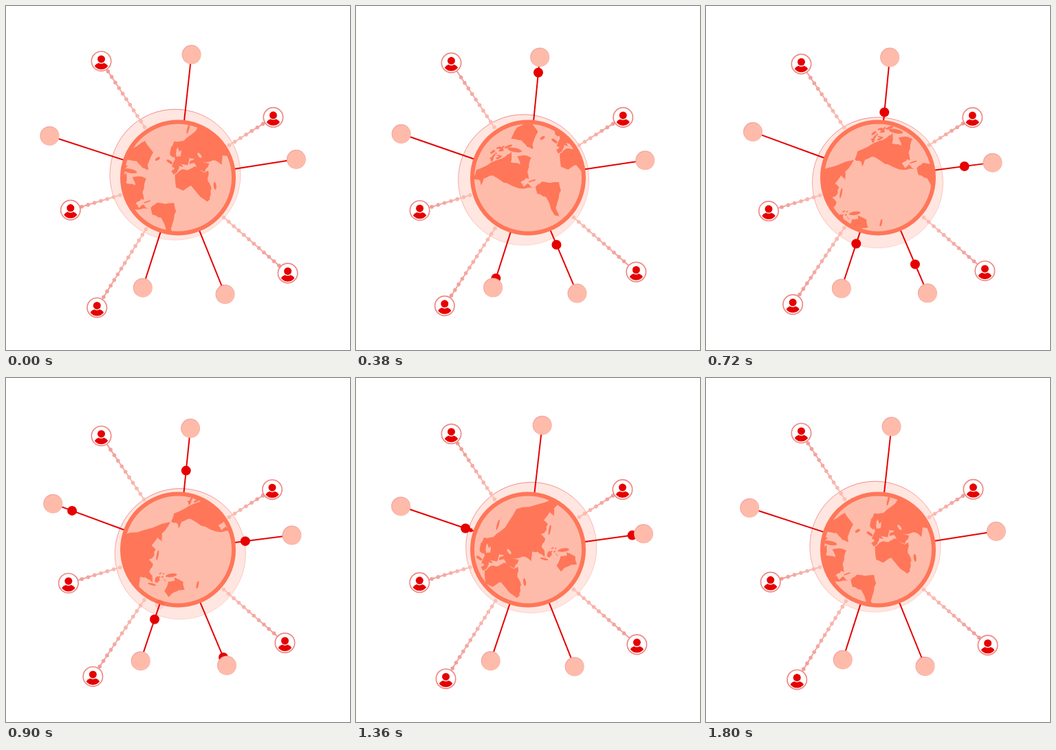
Animation, 500 px wide and 500 px high, one loop 1820 ms. Source, as an HTML page with a canvas:

```html
<!DOCTYPE html>
<html lang="en">
<head>
<meta charset="utf-8">
<title>Global network</title>
<style>
html, body { margin: 0; width: 100%; height: 100%; overflow: hidden; background: #fff; }
canvas { display: block; width: 500px; height: 500px; }
</style>
</head>
<body>
<canvas id="stage" width="500" height="500"></canvas>
<script>
const ctx = document.getElementById('stage').getContext('2d');
const TAU = Math.PI * 2;
const LOOP = 1820, TURN = 1800, STEP = 20, SPAN = 540;
const CX = 250, CY = 249.5, RIM = 84;
const RED = '#e60000', CORAL = '#ff7658', PEACH = '#ffbbaa';
const rad = d => d * Math.PI / 180;

let seed = 7;
function random() {
  seed = seed * 16807 % 2147483647;
  return seed / 2147483647;
}
const jitter = r => (random() * 2 - 1) * r;

// World map: softened Mercator, key points joined by rough coastlines
const WIDTH = 280, SCALE = WIDTH / 360, SOFT = .88;
const lands = [];

function project(lon, lat) {
  const y = Math.log(Math.tan(Math.PI / 4 + rad(lat) * SOFT / 2)) / SOFT;
  return [lon * SCALE, -y * WIDTH / TAU];
}

function land(...c) {
  const points = [];
  for (let i = 0; i < c.length; i += 2) points.push(project(c[i], c[i + 1]));
  const path = new Path2D();
  points.forEach(([x, y], i) => {
    const [nx, ny] = points[(i + 1) % points.length];
    const rough = Math.min(.9, Math.hypot(nx - x, ny - y) * .1);
    path.lineTo(x, y);
    for (const k of [.33, .67]) path.lineTo(x + (nx - x) * k + jitter(rough), y + (ny - y) * k + jitter(rough));
  });
  path.closePath();
  lands.push(path);
}

// Lens-shaped island between two places
function lens(lon1, lat1, lon2, lat2, width) {
  const [x1, y1] = project(lon1, lat1), [x2, y2] = project(lon2, lat2);
  const path = new Path2D();
  path.ellipse((x1 + x2) / 2, (y1 + y2) / 2, Math.hypot(x2 - x1, y2 - y1) / 2, width / 2,
    Math.atan2(y2 - y1, x2 - x1), 0, TAU);
  return path;
}
const isle = (...args) => lands.push(lens(...args));

function scatter(lon, lat, dLon, dLat, count, size) {
  for (let i = 0; i < count; i++) {
    const a = lon + jitter(dLon), b = lat + jitter(dLat);
    isle(a, b, a + size + jitter(size), b + jitter(size / 3), 1.5 + random() * size / 4);
  }
}

// Africa
land(-6,36, 10,37, 20,31, 33,31, 43,12, 51,12, 40,-5, 40,-15, 33,-26, 26,-34, 19,-35, 12,-17, 9,4,
  -8,4, -17,15, -10,30);
// Eurasia
land(-9,37, -9,43, -1,44, -4,48, 8,54, 10,57, 20,54, 28,60, 22,60, 24,65, 18,61, 13,56, 6,58, 5,62, 14,68,
  25,71, 40,67, 68,69, 104,77, 140,72, 190,66, 165,60, 157,51, 155,59, 137,54, 140,47, 127,39, 119,39, 122,30,
  108,21, 109,12, 103,2, 97,17, 88,22, 78,8, 72,21, 57,26, 50,30, 59,22, 44,13, 35,28, 36,36, 27,38,
  29,41, 40,41, 33,46, 23,38, 13,45, 16,38, 9,44, -1,37);
// North America, Greenland
land(-168,66, -156,71, -125,70, -95,68, -82,69, -93,60, -80,52, -77,62, -65,59, -56,52, -66,46, -76,37,
  -80,26, -84,30, -97,28, -95,18, -87,21, -83,10, -78,8, -95,15, -106,22, -114,31, -124,42, -135,58,
  -152,60, -164,55, -160,60);
land(-70,78, -50,82, -22,82, -20,72, -38,66, -44,60, -52,65, -55,73);
// South America, Australia
land(-77,8, -62,10, -50,0, -35,-7, -40,-22, -54,-34, -65,-42, -68,-55, -74,-50, -70,-18, -81,-5);
land(114,-23, 130,-12, 136,-15, 140,-17, 142.5,-11, 153,-26, 148,-38, 138,-34, 125,-33, 115,-35);
isle(44,-25, 50,-12, 4);     // Madagascar
isle(0,51, -5,59, 4);        // Britain
isle(-24,65, -14,65, 4);     // Iceland
isle(131,32, 144,44, 3);     // Japan
isle(109,-2, 118,6, 6);      // Borneo
isle(95,5, 106,-6, 3);       // Sumatra
isle(131,-1, 150,-9, 5);     // New Guinea
isle(168,-46, 178,-38, 3);   // New Zealand
isle(-84,22, -70,19, 2);     // Cuba
isle(-85,73, -65,64, 6);     // Baffin
isle(52,71, 67,77, 3);       // Novaya Zemlya
scatter(-105, 74, 20, 4, 16, 8);
scatter(122, 2, 8, 10, 10, 3);
const caspian = lens(51, 46, 52, 37, 4);

// A node drifts to and fro along (sx, sy), delayed by lag degrees
const node = (x, y, sx, sy, lag, start, span) => ({ x, y, sx, sy, lag, start, span });
const users = [
  node(138.5, 82.2, 0, -2.2, -24),
  node(387.7, 162, .8, -.2, 23),
  node(407.5, 386.7, 2.2, 1.8, -20),
  node(129.3, 436.2, 3.2, 2.4, -22),
  node(92.3, 297.4, 1.5, -.8, 0)
];
const balls = [
  node(268.8, 71.8, 2, -3.3, -68, 248, SPAN),
  node(418.6, 225.7, 3.3, -3, 14, 455, SPAN),
  node(319.7, 418.4, 2.4, -1.2, 120, -40, SPAN),
  node(197.2, 410.3, 2.2, -1.2, 45, 288, SPAN),
  node(65.8, 185.7, -2.5, 3.1, -12, 700, 740)
];

function place({ x, y, sx, sy, lag }, a) {
  const sway = Math.cos(a - rad(lag));
  const px = x + sx * sway, py = y + sy * sway;
  const dist = Math.hypot(px - CX, py - CY);
  const ux = (px - CX) / dist, uy = (py - CY) / dist;
  return { x: px, y: py, dist, on: r => [CX + ux * r, CY + uy * r] };
}

function disc(x, y, r, fill) {
  ctx.beginPath();
  ctx.arc(x, y, r, 0, TAU);
  ctx.fillStyle = fill;
  ctx.fill();
}

function ring(x, y, r, width, color) {
  ctx.beginPath();
  ctx.arc(x, y, r, 0, TAU);
  ctx.lineWidth = width;
  ctx.strokeStyle = color;
  ctx.stroke();
}

function line(a, b, width, color) {
  ctx.beginPath();
  ctx.moveTo(...a);
  ctx.lineTo(...b);
  ctx.lineWidth = width;
  ctx.strokeStyle = color;
  ctx.stroke();
}

function blend(a, b, from, to) {
  const g = ctx.createLinearGradient(...a, ...b);
  g.addColorStop(0, from);
  g.addColorStop(1, to);
  return g;
}

function halo(a) {
  const b = rad(-125) - a;
  const x = 249.6 + 6.4 * Math.cos(b), y = 250.4 + 6.4 * Math.sin(b);
  disc(x, y, 95.3, '#ffe6e0');
  ring(x, y, 95, 1, blend([x - 40, y - 95], [x + 40, y + 95], 'rgba(232,90,95,.7)', 'rgba(250,190,180,.4)'));
}

function globe(p) {
  disc(CX, CY, 82, PEACH);
  ctx.save();
  ctx.beginPath();
  ctx.arc(CX, CY, 80, 0, TAU);
  ctx.clip();
  ctx.translate(CX, CY);
  ctx.rotate(rad(-31));
  ctx.translate(3.4 + WIDTH * (p - 2), 23.2);
  for (let k = 0; k < 4; k++) {
    ctx.fillStyle = CORAL;
    lands.forEach(l => ctx.fill(l));
    ctx.fillStyle = PEACH;
    ctx.fill(caspian);
    ctx.translate(WIDTH, 0);
  }
  ctx.restore();
  ring(CX, CY, 81, 6, CORAL);
}

function beads(n) {
  const end = n.dist - 15;
  const tint = blend(n.on(86), n.on(end), '#fcc0b5', '#f09c98');
  line(n.on(86), n.on(end), 2, tint);
  for (let r = 88; r < end - 1; r += 9.7) disc(...n.on(r), 2.8, tint);
}

function user({ x, y }) {
  disc(x, y, 14.5, '#fff');
  ring(x, y, 14.2, 1.7, '#f08884');
  ctx.save();
  ctx.beginPath();
  ctx.arc(x, y, 12, 0, TAU);
  ctx.clip();
  ctx.beginPath();
  ctx.ellipse(x, y + 9.5, 10.2, 7.5, 0, 0, TAU);
  ctx.fillStyle = RED;
  ctx.fill();
  ctx.restore();
  disc(x, y - 3, 6.8, '#fff');
  disc(x, y - 3, 5.5, RED);
}

const since = (t, start) => ((t - start) % TURN + TURN) % TURN;

// One dot runs in and fades at the rim; shortly before, another sets out
function pulses(n, { start, span }, t) {
  const len = n.dist - RIM, fade = 80;
  const inn = since(t, start);
  if (inn < span + fade) {
    ctx.globalAlpha = Math.min(1, 1 - (inn - span) / fade);
    disc(...n.on(n.dist - len * Math.min(1, inn / span)), 7, RED);
    ctx.globalAlpha = 1;
  }
  const leave = start + span * .87;
  const out = since(t, leave), outSpan = Math.min(SPAN, TURN - leave);
  if (out < outSpan) disc(...n.on(RIM + len * out / outSpan), 7 * Math.min(1, out / 40), RED);
}

function ball({ x, y }) {
  disc(x, y, 14, '#f3aaa6');
  disc(x + .5, y + .6, 13.1, PEACH);
}

function draw(now) {
  const t = Math.floor(now % LOOP / STEP) * STEP;
  const p = t / TURN, a = p * TAU;
  const people = users.map(u => place(u, a));
  const spots = balls.map(b => place(b, a));

  ctx.fillStyle = '#fff';
  ctx.fillRect(0, 0, 500, 500);
  halo(a);
  spots.forEach(s => line(s.on(RIM - 2), [s.x, s.y], 2, RED));
  globe(p);
  people.forEach(beads);
  people.forEach(user);
  spots.forEach((s, i) => pulses(s, balls[i], t));
  spots.forEach(ball);
}

const begin = performance.now();
function tick() {
  draw(performance.now() - begin);
  requestAnimationFrame(tick);
}
tick();
</script>
</body>
</html>
```
